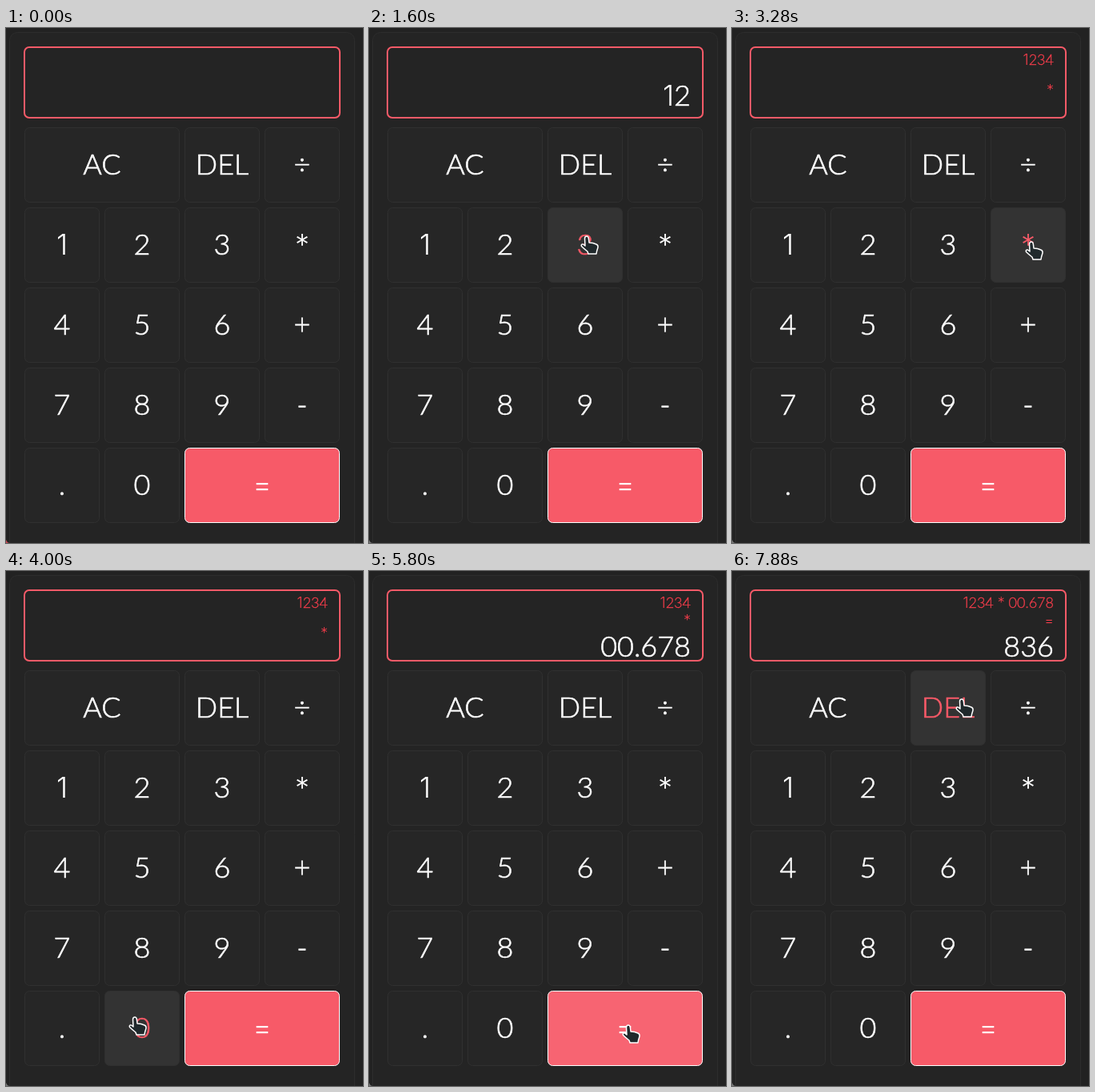
Write an HTML page with a canvas that moves like this. It is 446 by 643 pixels and loops after 8 s.

```html
<!DOCTYPE html>
<html lang="en">
<head>
<meta charset="utf-8">
<title>Calculator</title>
<style>
  html, body { margin: 0; width: 446px; height: 643px; overflow: hidden; background: #222; }
  canvas { display: block; }
</style>
</head>
<body>
<canvas id="stage" width="446" height="643"></canvas>
<script>
const ctx = document.getElementById('stage').getContext('2d');
const LOOP = 8000, HOVER_FADE = 120, LONGEST_TRAVEL = 520;
const RED = '#f75a68', SMALL_RED = '#f23c4a', WHITE = '#fff';

const layout = [['AC', 'AC', 'DEL', '÷'], ['1', '2', '3', '*'], ['4', '5', '6', '+'],
                ['7', '8', '9', '-'], ['.', '0', '=', '=']];
const buttons = {};
layout.forEach((row, r) => row.forEach((label, c) => {
  if (buttons[label]) buttons[label].w += 100;
  else buttons[label] = { label, x: 23.5 + c * 100, y: 124.5 + r * 100, w: 93, h: 93 };
}));

// Where the pointer goes: button, arrival time, press times, offset from the button's centre.
const stops = [
  { key: '÷', at: 80, dx: 38, dy: -39 },
  { key: '*', at: 260, dx: -34, dy: -50 },
  { key: '8', at: 800, dx: -25, dy: -18 },
  { key: '1', at: 1160, press: [1240] },
  { key: '2', at: 1360, press: [1400] },
  { key: '3', at: 1520, press: [1800], dx: 2, dy: -11 },
  { key: '4', at: 2160, press: [2240] },
  { key: '6', at: 2540, dx: 32, dy: 5 },
  { key: '*', at: 2920, press: [3200] },
  { key: '0', at: 3980, press: [4160, 4280], dx: -9, dy: -14 },
  { key: '.', at: 4440, press: [4520] },
  { key: '6', at: 4820, press: [4880] },
  { key: '7', at: 5100, press: [5180] },
  { key: '8', at: 5320, press: [5440], dx: 0, dy: 0 },
  { key: '=', at: 5740, press: [6000] },
  { key: '6', at: 6560, dx: 21, dy: -34 },
  { key: 'DEL', at: 6920, press: [7160, 7320, 7480, 7880], dx: 17, dy: -11 }
].map(({ key, at, press = [], dx = 4, dy = -4 }) => {
  const b = buttons[key];
  return { key, at, press, x: b.x + b.w / 2 + dx, y: b.y + b.h / 2 + dy,
           free: press.length ? press[press.length - 1] + 40 : at + 60 };
});

function pointerAt(t) {
  if (t < stops[0].at) return null;
  const i = stops.findIndex(s => s.at > t);
  if (i < 0) return stops[stops.length - 1];
  const from = stops[i - 1], to = stops[i];
  const leave = Math.max(from.free, to.at - LONGEST_TRAVEL);
  const u = Math.max(0, (t - leave) / (to.at - leave)), k = u * u * (3 - 2 * u);
  return { x: from.x + (to.x - from.x) * k, y: from.y + (to.y - from.y) * k };
}

const operations = { '*': (a, b) => a * b, '÷': (a, b) => a / b,
                     '+': (a, b) => a + b, '-': (a, b) => a - b };

function pressKey({ upper, operator, entry }, key) {
  if (key === 'DEL') return { upper, operator, entry: entry.slice(0, -1) };
  if (operations[key]) return { upper: entry, operator: key, entry: '' };
  if (key !== '=') return { upper, operator, entry: entry + key };
  const result = operations[operator](Number(upper), Number(entry));
  return { upper: `${upper} ${operator} ${entry}`, operator: '=',
           entry: String(Number(result.toFixed(6))) };
}

function calculatorAt(t) {
  return stops.flatMap(s => s.press.filter(p => p <= t).map(() => s.key))
    .reduce(pressKey, { upper: '', operator: '', entry: '' });
}

function isHovered(b, t) {
  const p = pointerAt(t);
  return !!p && p.x >= b.x && p.x <= b.x + b.w && p.y >= b.y && p.y <= b.y + b.h;
}

function hoverAmount(b, t) {
  let age = 0;
  while (age < HOVER_FADE && isHovered(b, t - age)) age += 10;
  return (age / HOVER_FADE) ** 2;
}

function box(x, y, w, h, radius, fill, stroke, line = 1) {
  ctx.beginPath();
  ctx.roundRect(x, y, w, h, radius);
  ctx.fillStyle = fill;
  ctx.fill();
  ctx.strokeStyle = stroke;
  ctx.lineWidth = line;
  ctx.stroke();
}

// The figure one and the symbols come from a plainer face; the rest is thickened a little.
function write(text, x, baseline, size, color, align) {
  const runs = (text.match(/[1=*]|[^1=*]+/g) || []).map(s => {
    const plain = /[1=*]/.test(s);
    const font = `300 ${size}px ${plain ? 'Inter' : 'Lato'}, sans-serif`;
    ctx.font = font;
    return { s, font, plain, width: ctx.measureText(s).width };
  });
  const total = runs.reduce((sum, r) => sum + r.width, 0);
  let left = align === 'right' ? x - total : x - total / 2;
  ctx.fillStyle = ctx.strokeStyle = color;
  ctx.lineWidth = size / 55;
  for (const r of runs) {
    ctx.font = r.font;
    ctx.fillText(r.s, left, baseline);
    if (!r.plain) ctx.strokeText(r.s, left, baseline);
    left += r.width;
  }
}

function drawButton(b, t) {
  const hover = hoverAmount(b, t), equals = b.label === '=';
  const shade = Math.round(38 + 13 * hover);
  const fill = equals ? `rgb(247, ${90 + 10 * hover}, ${104 + 10 * hover})`
                      : `rgb(${shade}, ${shade}, ${shade})`;
  box(b.x, b.y, b.w, b.h, 6, fill, equals ? WHITE : '#303030');
  write(b.label, b.x + b.w / 2, b.y + 58, 36, hover && !equals ? RED : WHITE);
}

function drawDisplay(t) {
  box(23, 24, 394, 88, 6, '#242424', RED, 2);
  const { upper, operator, entry } = calculatorAt(t);
  write(upper, 402, 46, 18, SMALL_RED, 'right');
  write(operator, 402, entry ? 68 : 84, 18, SMALL_RED, 'right');
  write(entry, 402, upper ? 107 : 97, 36, WHITE, 'right');
}

const hand = new Path2D('M6 13 L5.5 4 Q5.5 1 8 1 Q10 1 10.4 4 L11 9 Q16 9 20 11 ' +
  'Q22.5 12 22 15 L20.5 20 L20 23 L10 23 L9 20 Q5 17 1.5 13.5 Q0.5 10.5 3.5 11 Z');

function drawPointer(t) {
  const p = pointerAt(t);
  if (!p) return;
  ctx.save();
  ctx.translate(p.x - 8, p.y - 1);
  ctx.fillStyle = '#20292c';
  ctx.fill(hand);
  ctx.strokeStyle = WHITE;
  ctx.lineWidth = 1.5;
  ctx.lineJoin = 'round';
  ctx.stroke(hand);
  ctx.restore();
}

function draw(t) {
  ctx.fillStyle = '#222';
  ctx.fillRect(0, 0, 446, 643);
  box(4.5, 5.5, 431, 650, 10, '#242424', '#2d2d2d');
  ctx.fillStyle = t < 1000 ? '#c94a55' : '#777';
  ctx.beginPath();
  ctx.moveTo(0, 639);
  ctx.quadraticCurveTo(1, 642, 4, 643);
  ctx.lineTo(0, 643);
  ctx.fill();
  drawDisplay(t);
  Object.values(buttons).forEach(b => drawButton(b, t));
  drawPointer(t);
}

const start = performance.now();
function tick() {
  draw((performance.now() - start) % LOOP);
  requestAnimationFrame(tick);
}
tick();
</script>
</body>
</html>
```
